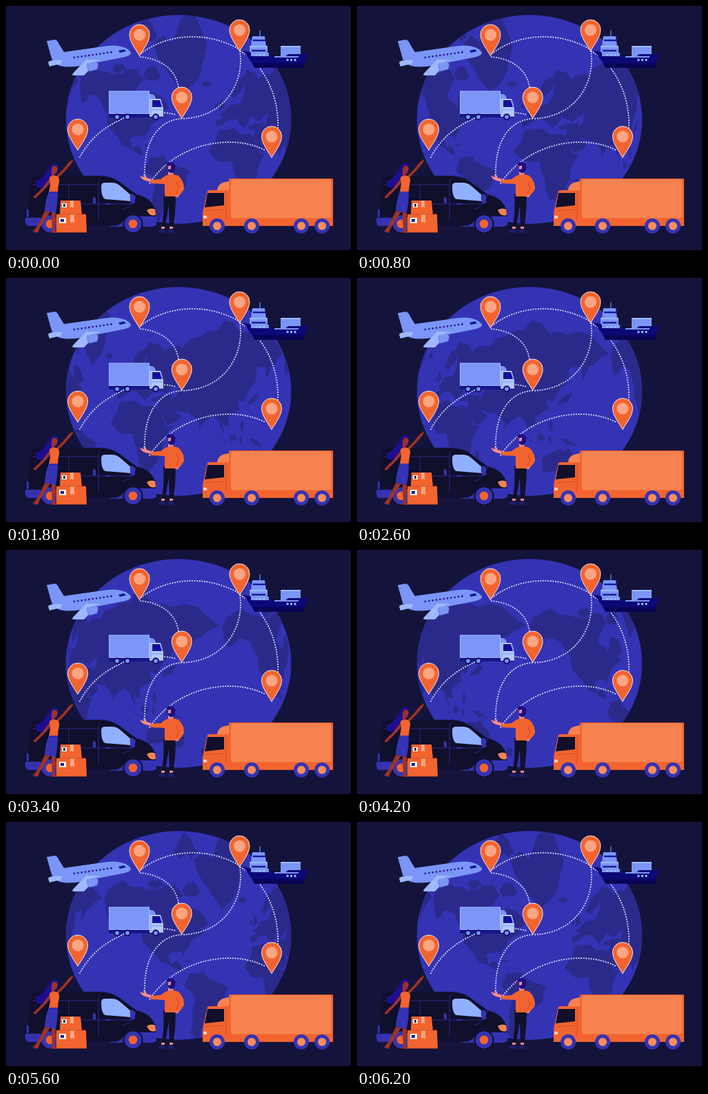
These frames come from a looping animation (500x355 px, 6.3 s). An HTML page:

```html
<!DOCTYPE html>
<html lang="en">
<head>
<meta charset="utf-8">
<title>Worldwide delivery</title>
<style>
html, body { margin: 0; width: 100%; height: 100%; overflow: hidden; background: #14133b; }
svg { display: block; width: 100vw; height: 100vh; }
.o { fill: #f2642f; } .p { fill: #f78450; } .q { fill: #fba583; }
.b { fill: #3533b3; } .l { fill: #7b96f7; } .s { fill: #9fb8ff; }
.n { fill: #15109a; } .d { fill: #100f2c; } .k { fill: #9c3327; } .f { fill: #f58c86; }
.line { fill: none; stroke-linecap: round; stroke-linejoin: round; }
</style>
</head>
<body>
<svg viewBox="0 0 500 355" preserveAspectRatio="none">
  <defs>
    <clipPath id="disc"><ellipse cx="250" cy="165" rx="163.300" ry="152"/></clipPath>
    <g id="pin">
      <path class="o" stroke="#fde6e2" d="M0 46C-5 37-14.500 26-14.500 15A14.500 14.500 0 0 1 14.500 15C14.500 26 5 37 0 46Z"/>
      <circle class="q" cy="15.500" r="8.600"/>
    </g>
    <g id="tyre"><circle class="b" r="11"/><circle r="6" fill="#f88e60"/></g>
    <g id="wheel"><circle r="5" fill="#15126f"/><circle class="l" r="2.800"/></g>
    <g id="hub"><circle class="d" r="14.500"/><circle class="b" r="12.500"/><circle class="o" r="6.300"/></g>
  </defs>

  <rect width="500" height="355" fill="#14133b"/>
  <g clip-path="url(#disc)">
    <rect x="80" y="8" width="340" height="314" fill="#3433b4"/>
    <path id="land" fill="#2b2a8b"/>
  </g>

  <g class="line" stroke="#dfe2ff" stroke-width="2.100" stroke-dasharray="0 3.600">
    <path d="M195 74C223 77 245 90 250 118"/>
    <path d="M196 69C232 41 290 35 338 63"/>
    <path d="M339 66C345 104 324 161 256 164"/>
    <path d="M254 164C222 166 200 195 201 246"/>
    <path d="M340 66C370 82 396 126 394 178"/>
    <path d="M374 209C330 187 250 196 208 258"/>
    <path d="M107 220C120 195 141 177 165 166C190 152 222 152 245 158"/>
  </g>

  <!-- plane -->
  <g>
    <path class="l" d="M59 51L70 49Q74 49 76 54L84 67L140 59Q160 55 173 61Q181 65 181 69Q179 73 168 75L118 85Q92 91 78 87Q68 84 66 76Z"/>
    <path class="s" d="M61 82Q63 78 82 79L79 84L63 88Z"/>
    <path class="s" d="M116 78L135 78L113 101H97Q95 100 98 97Z"/>
    <path class="l" d="M118 84L131 80Q135 84 132 92L121 95Q117 91 118 84Z"/>
    <path class="line" stroke="#5874df" stroke-width=".8" d="M118 84Q117 91 121 95L132 92Q135 85 131 80"/>
    <path class="line" stroke="#1c1a96" stroke-width="2.800" stroke-dasharray="0 5.400" d="M99 75L154 67"/>
    <path class="n" d="M163 65L171 63L174 66L165 68Z"/>
  </g>

  <!-- ship -->
  <g>
    <path class="line" stroke="#4a60dc" stroke-width="1.800" d="M368 36V45"/>
    <path class="l" d="M357 44H375L377 58H355ZM353 59H379V73H353Z"/>
    <path class="line" stroke="#1c1a96" stroke-width="2.600" stroke-dasharray="3 2" stroke-linecap="butt" d="M359 50H375M357 65H377"/>
    <path class="l" d="M398 58H427V74H398Z"/>
    <path class="s" d="M398 58H427V60H398ZM353 58H379V60H353Z"/>
    <path d="M343 65L354 67L358 73L404 74L409 70H437L431 90H360Q356 80 343 65Z" fill="#0c0877"/>
    <path d="M357 83H433L431 90H361Z" fill="#090556"/>
    <path class="l" d="M355 68H381V73H355ZM389 73H424V75H389Z"/>
    <path class="line" stroke="#9fb8ff" stroke-width="3.400" stroke-dasharray="0 5.500" d="M363 71H375M408 78.500H420"/>
  </g>

  <!-- small truck -->
  <g>
    <path d="M149 155H228V162H149Z" fill="#18158a"/>
    <path class="s" d="M149 123.500H208V157H149Z"/>
    <path class="l" d="M150 124.500H207V156H150ZM208 128Q216 127 217 135H208Z"/>
    <path d="M208 135H224L228 149V161H208Z" fill="#b3c7ff"/>
    <path class="n" d="M212 137H223L226 147H212Z"/>
    <path class="line" stroke="#7b96f7" d="M210 137V159M211 151H227"/>
    <use href="#wheel" x="161" y="161.500"/><use href="#wheel" x="176" y="161.500"/><use href="#wheel" x="217" y="161.500"/>
  </g>

  <use href="#pin" x="193.500" y="26.500"/>
  <use href="#pin" x="338.500" y="19.500"/>
  <use href="#pin" x="254.700" y="117.500"/>
  <use href="#pin" x="104" y="164"/>
  <use href="#pin" x="385" y="174.500"/>

  <!-- van -->
  <g>
    <path class="d" d="M36 255Q38 247 48 247H133Q151 247 162 254L189 274Q211 279 216 296L218 313Q218 319 211 319H35Q30 318 31 306Z"/>
    <path class="b" d="M28 309Q27 308 32 308H50V320H32Q27 319 28 309ZM150 320Q166 321 170 312Q176 304 187 305Q195 306 199 306H218V316Q218 321 211 321H152ZM30 296H33V307H30Z"/>
    <path class="line" stroke="#2b2a83" d="M39 260H133M91 260V309M134 252V313M92 288H182M189 274Q186 291 170 296"/>
    <path d="M138 262Q138 257 144 257H154Q161 257 167 263L182 276V284L144 281Q138 279 138 262Z" fill="#91b0ff"/>
    <path class="b" d="M180 274Q187 272 187 278V287H181Q179 280 180 274ZM126 279Q129 277 130 280V287H126Z"/>
    <path class="line" stroke="#3533b3" stroke-width="1.600" d="M144 288H152"/>
    <path class="p" d="M204 297Q210 293 216 296L217 304Q208 307 204 297Z"/>
    <use href="#hub" x="184" y="317"/><use href="#hub" x="64" y="317"/>
  </g>

  <!-- boxes -->
  <g>
    <path class="o" d="M79 283H108L110 303H78ZM73 303H116L117 329.500H73Z"/>
    <path class="q" d="M93 283H98V294L95.500 292L93 294ZM93 303H99V316L96 314L93 316Z"/>
    <path class="line" stroke="#c84420" stroke-width=".8" d="M78 303H115"/>
    <path fill="#fff" d="M81 287H88V293H81ZM77 308H87V316H77Z"/>
    <path d="M83 288H86V292H83ZM79 310H84V314H79Z" fill="#221c7a"/>
  </g>

  <!-- woman -->
  <g>
    <path d="M63 235Q69 225 76 232L75 242L67 248Q64 260 52 264Q41 266 43 255Q52 252 57 243Z" fill="#1d0e92"/>
    <path class="line" stroke="#9c3327" stroke-width="3.800" d="M65 252L56 264L43 277M74 249L84 239L93 228"/>
    <path class="k" d="M91 229L96 223L97 226L93 231ZM45 274L39 278L43 280ZM66 238Q67 231 73 233L75 236L73 243L70 244L71 249H66Z"/>
    <path class="k" d="M58 295L66 296L56 312L47 326L44 323ZM66 295L72 296V312L70 326H67L66 312ZM44 322L48 325L46 330L39 328ZM67 325H71L74 330H66Z"/>
    <path class="o" d="M63 249Q70 245 75 248Q79 252 76 260L75 271H62L64 260Z"/>
    <path class="b" d="M62 270H75Q75 287 72 301L56 298Q57 283 62 270Z"/>
  </g>

  <!-- man -->
  <g>
    <path d="M228 274H246Q246 300 242 325H237L236 290L230 325H225Q230 300 228 274Z" fill="#11102c"/>
    <path class="f" d="M225 321H230V325H225ZM237 321H242V325H237ZM194 247L200 249L199 245L202 246L204 250L211 252L210 256L202 254Q196 252 194 247ZM235 231Q242 228 243 236L242 246H235ZM249 271L245 278H249L253 273Z"/>
    <path d="M225 324H230L231 330H219Q220 327 225 324ZM236 324H242L244 330H234Z" fill="#1d1c66"/>
    <path class="o" d="M231 247Q240 243 250 247Q258 255 258 265Q257 272 247 277H230V259L210 258L209 253L224 252Z"/>
    <path class="line" stroke="#cf4522" d="M247 256L251 264L247 272"/>
    <path d="M232 231Q235 225 241 228Q247 230 245 237Q244 243 239 243Q235 242 234 238L239 237V232Q234 234 232 231Z" fill="#1d0e82"/>
  </g>

  <!-- large truck -->
  <g>
    <path class="p" d="M306 268Q307 256 325 255V270H306Z"/>
    <path class="o" d="M292 269Q293 268 298 268H325V307H474V320H285V302Q288 285 292 269Z"/>
    <path class="d" d="M292 272H316V290L288 293Z"/>
    <path class="line" stroke="#d14b24" d="M319 270V310M290 298L316 296"/>
    <path fill="#ffd2bd" d="M286 305H291V309H286Z"/>
    <rect class="o" x="323" y="251" width="151" height="61" rx="2"/>
    <rect class="p" x="326" y="252.500" width="145" height="56" rx="4"/>
    <use href="#tyre" x="306" y="320"/><use href="#tyre" x="356" y="320"/>
    <use href="#tyre" x="428" y="320"/><use href="#tyre" x="458" y="320"/>
  </g>
</svg>
<script>
const LOOP = 6300, STEP = 100;
const RADIUS = 163, SCALE_X = 1.45, SCALE_Y = 1.37, EQUATOR = 232, START_LON = -47;

// key points of each coast, longitude,latitude
const coasts = {
  northAmerica: "-168,66 -156,71 -115,69 -95,71 -82,67 -94,59 -80,52 -77,62 -65,59 -56,52 -66,49 -60,46 -74,40 -81,31 -81,25 -84,30 -97,28 -95,18 -87,21 -83,10 -79,8 -105,20 -112,30 -124,40 -124,48 -135,58 -150,60 -162,55",
  southAmerica: "-77,8 -62,10 -50,0 -35,-7 -40,-21 -55,-35 -68,-53 -75,-48 -70,-18 -81,-5",
  greenland: "-72,78 -35,83.5 -18,78 -24,70 -43,60 -53,67",
  africa: "-6,35 10,37 20,31 33,31 43,12 51,12 40,-4 40,-15 27,-34 19,-34 9,4 -8,5 -17,15",
  europe: "-9,37 3,43 13,44 18,40 23,37 28,41 31,46 42,42 50,46 62,48 62,68 42,67 27,71 13,66 5,60 11,58 18,61 24,66 23,60 18,55 8,54 -4,48 -1,44 -9,43",
  asia: "27,37 36,36 34,29 44,13 59,22 50,29 67,25 73,20 77,8 81,15 91,22 98,15 103,2 101,13 109,12 107,21 121,29 119,38 126,35 129,41 140,50 142,59 156,60 157,52 165,60 190,66 140,73 104,77 70,72 56,68 53,40 49,38 50,42 38,41",
  australia: "114,-22 130,-12 136,-15 142,-11 153,-27 149,-38 131,-32 115,-35",
  japan: "130,32 140,35 145,43 140,42",
  sumatra: "95,5 106,-6 115,-8 103,-5",
  newGuinea: "131,-1 141,-3 151,-10 138,-7",
  britain: "-5,50 1,52 -3,58 -5,55"
};
// centre longitude, latitude, half width, half height
const isles = [[-19, 65, 5, 1.3], [-8, 53, 2, 1.5], [47, -19, 2.5, 6], [113, 0, 4, 4], [122, -2, 2, 4],
  [123, 12, 2, 6], [-78, 21, 5, 1], [-74, 69, 9, 3], [-110, 71, 8, 2], [-80, 80, 12, 2], [173, -41, 3, 4]];

let seed = 11;
const random = () => (seed = seed * 16807 % 2147483647) / 2147483647;

// midpoint displacement gives the coasts their ragged edge
function roughen(ring) {
  return ring.flatMap(([x, y], i) => {
    const [u, v] = ring[(i + 1) % ring.length];
    const shift = (random() - 0.5) * 0.3;
    return [[x, y], [(x + u) / 2 + (v - y) * shift, (y + v) / 2 - (u - x) * shift * 0.6]];
  });
}

function ellipse([lon, lat, w, h]) {
  return Array.from({ length: 6 }, (_, i) => [lon + w * Math.cos(i * Math.PI / 3), lat + h * Math.sin(i * Math.PI / 3)]);
}

function mercator(lat) {
  const angle = Math.min(lat, 84) * Math.PI / 180;
  return EQUATOR - SCALE_Y * Math.asinh(Math.tan(angle)) * 180 / Math.PI;
}

const parse = text => text.split(" ").map(pair => pair.split(",").map(Number));
const rings = [...Object.values(coasts).map(parse), ...isles.map(ellipse)]
  .map(ring => roughen(roughen(ring)).map(([lon, lat]) => [lon, mercator(lat)]));

// the flat map bulges in the middle and narrows towards the rim
function bulge(degrees) {
  const angle = degrees * SCALE_X / RADIUS;
  return 250 + RADIUS * Math.sin(Math.max(-Math.PI / 2, Math.min(Math.PI / 2, angle)));
}

function outline(ring, centre) {
  return "M" + ring.map(([lon, y]) => bulge(lon - centre).toFixed(1) + " " + y.toFixed(1)).join("L") + "Z";
}

const land = document.getElementById("land");

function draw(time) {
  const turn = Math.floor(time % LOOP / STEP) * STEP / LOOP;
  const centre = START_LON + 360 * turn;
  const turns = [-360, 0, 360];
  land.setAttribute("d", rings.flatMap(ring => turns.map(t => outline(ring, centre + t))).join(""));
}

const begin = performance.now();
function tick() {
  draw(performance.now() - begin);
  requestAnimationFrame(tick);
}
tick();
</script>
</body>
</html>
```
